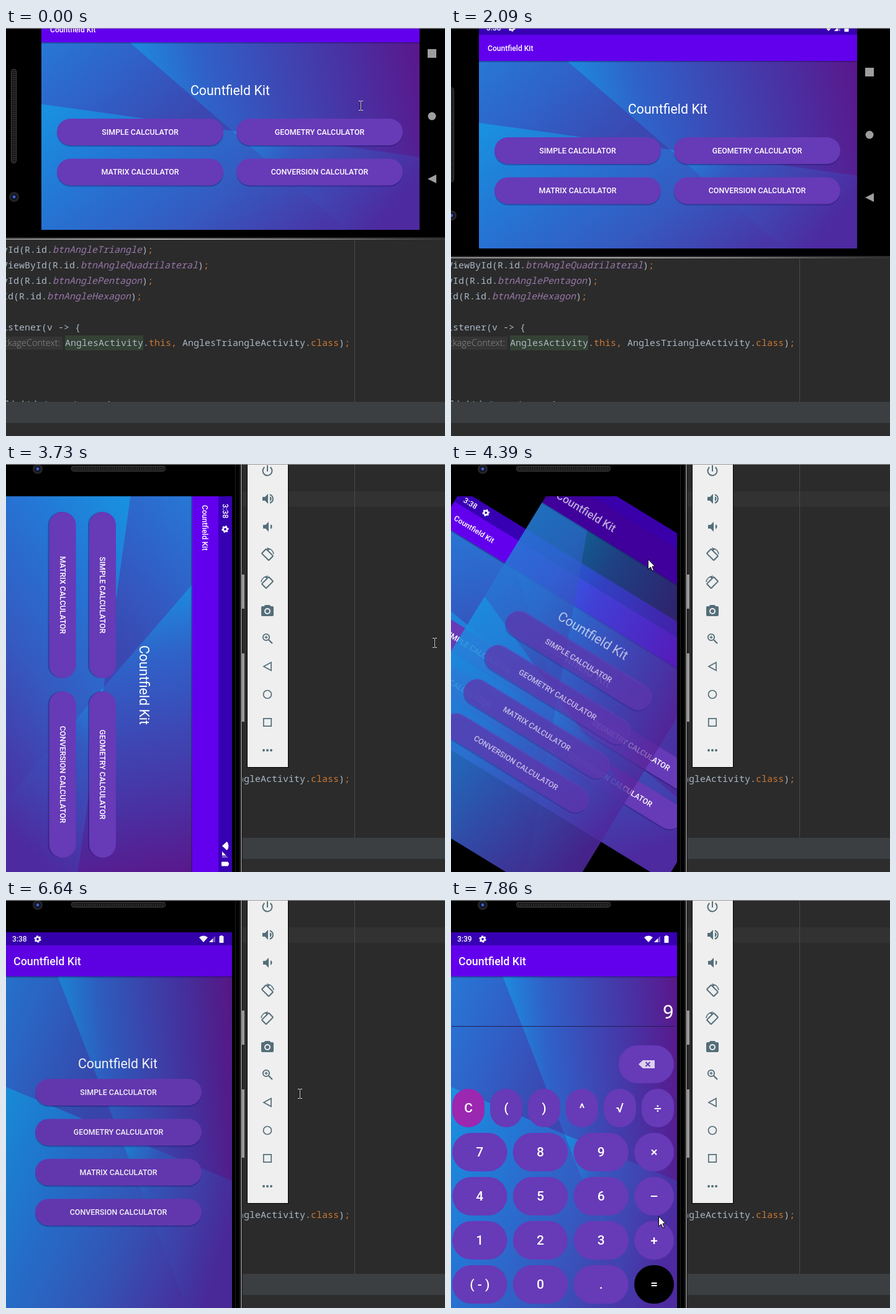
An HTML page with a canvas that plays this animation: 707x657 px, repeating every 8 s.

```html
<!DOCTYPE html>
<html lang="en">
<head>
<meta charset="utf-8">
<title>Calculator app rotation demo</title>
<style>
  html, body { margin: 0; width: 100%; height: 100%; overflow: hidden; background: #2b2b2b; }
  canvas { display: block; }
</style>
</head>
<body>
<canvas id="stage" width="707" height="657"></canvas>
<script>
const c = document.getElementById('stage').getContext('2d');
const LOOP = 8000, TURNED = 3490, TAU = Math.PI * 2;
const APP = 'Countfield Kit', MODES = ['SIMPLE', 'GEOMETRY', 'MATRIX', 'CONVERSION'];
const VIOLET = '#673ab7', SLATE = '#546e7a', GREY = '#9e9e9e';
const WIDE = [609, 366], TALL = [366, 609];

// Waypoints: arrival time, x, y
const windowPath = [[1400, 57, -41], [1580, 60, -30], [2090, 45, -11], [2240, 44, 2], [2640, 45, 8]];
const cursorPath = [[0, 571, 125], [790, 628, 27], [1060, 760, -20], [2950, 569, 110], [3340, 520, 177],
  [3730, 691, 289], [3880, 476, 204], [4510, 247, 131], [5020, 333, 43], [5140, 292, 59], [5440, 404, 179],
  [5980, 229, 331], [6370, 49, 310], [6640, 474, 312], [7030, 129, 410], [7470, 236, 408], [7860, 334, 509]];

const ramp = (t, from, to) => Math.min(1, Math.max(0, (t - from) / (to - from)));
const ease = p => p * p * (3 - 2 * p);

// Rests at each waypoint, then takes at most `longest` ms to reach the next
function along(path, t, longest) {
  const i = Math.max(1, path.findIndex(p => p[0] > t));
  const [from, to] = t >= path.at(-1)[0] ? [path.at(-1), path.at(-1)] : [path[i - 1], path[i]];
  const p = ramp(t, Math.max(from[0], to[0] - longest), to[0] + 1e-6);
  return [1, 2].map(k => Math.round(from[k] + (to[k] - from[k]) * p));
}

function isolated(draw) { c.save(); draw(); c.restore(); }

function rect(x, y, w, h, color) { c.fillStyle = color; c.fillRect(x, y, w, h); }

function pill(x, y, w, h, color, r = Math.min(w, h) / 2) {
  c.fillStyle = color;
  c.beginPath(); c.roundRect(x, y, w, h, r); c.fill();
}

function poly(points, color) {
  c.fillStyle = color;
  c.beginPath();
  points.forEach(p => c.lineTo(...p));
  c.closePath(); c.fill();
}

function disc(x, y, r, color) {
  c.fillStyle = color;
  c.beginPath(); c.arc(x, y, r, 0, TAU); c.fill();
}

function stroke(color, width, build) {
  c.strokeStyle = color;
  c.lineWidth = width;
  c.beginPath(); build(); c.stroke();
}

const line = (x0, y0, x1, y1) => { c.moveTo(x0, y0); c.lineTo(x1, y1); };

function shade(x0, y0, x1, y1, ...colors) {
  const g = c.createLinearGradient(x0, y0, x1, y1);
  colors.forEach((color, i) => g.addColorStop(i / (colors.length - 1), color));
  return g;
}

// cy is the middle of the capital letters
function label(str, x, cy, size, weight = 500, align = 'center') {
  c.font = `${weight} ${size}px Roboto, sans-serif`;
  c.textAlign = align;
  c.fillStyle = '#fff';
  c.fillText(str, x, cy + size * 0.355);
}

// ---- code editor ----
function code(x, y, ...parts) {
  c.textAlign = 'left';
  parts.forEach(([str, color = '#a9b7c6', style = '']) => {
    c.font = style + ' 15px "Noto Sans Mono", monospace';
    c.fillStyle = color;
    c.fillText(str, x, y);
    x += str.length * 9;
  });
}

function editor() {
  const orange = '#cc7832';
  rect(0, 0, 707, 657, '#2b2b2b');
  rect(0, 44, 707, 25, '#323232');
  rect(561, 0, 1, 602, '#4a4a4a');
  [['Triangle', 75], ['Quadrilateral', 120], ['Pentagon', 75], ['Hexagon', 66]].forEach(([shape, x], i) =>
    code(x - 162, 362 + i * 25, ['findViewById(R.id.'], ['btnAngle' + shape, '#9876aa', 'italic'], [')'], [';', orange]));
  code(-105, 487, ['setOnClickListener(v -> {']);
  rect(0, 497, 91, 21, '#353535');
  c.font = '300 14.5px "Open Sans", sans-serif';
  c.textAlign = 'right';
  c.fillStyle = '#909090';
  c.fillText('packageContext:', 87, 512);
  rect(95, 495, 126, 24, '#344134');
  code(95, 512, ['AnglesActivity.'], ['this,', orange], [' AnglesTriangleActivity.'], ['class', orange], [')'], [';', orange]);
  code(-56, 611, ['setOnClickListener(v -> {']);
  rect(0, 602, 707, 34, '#3c3f41');
  rect(0, 636, 707, 21, '#2d2d2d');
}

// ---- phone hardware, in landscape coordinates from the screen's corner ----
function phone() {
  const strip = (y, h, color) => rect(-300, y, 1300, h, color);
  strip(-17, 400, '#111');
  strip(-16, 2, '#777');
  rect(126, -20, 55, 4, '#999');
  rect(253, -20, 110, 4, '#999');
  strip(-11, 389, '#000');
  strip(-6, 1, '#222');
  strip(378, 5, '#2a2a2a');
  strip(380, 2, shade(-57, 0, 650, 0, '#8a8a8a', '#b0b0b0', '#888', '#333'));
  pill(-49, 107, 9, 152, '#484848');
  pill(-48, 108, 7, 150, '#141414');
  for (let y = 111; y < 256; y += 3) rect(-47, y, 5, 1, '#3a3a3a');
  ['#262626', '#10142c', '#4260c0'].forEach((color, i) => disc(-44, 313, 8 - i * 2.8, color));
  rect(622, 75, 14, 14, GREY);
  disc(629, 183, 6.5, GREY);
  poly([[622, 284], [636, 277], [636, 291]], GREY);
}

// ---- app screens ----
function wallpaper(w, top, h) {
  const cross = [.505, .473];
  isolated(() => {
    c.translate(0, top);
    c.scale(w, h - top);
    rect(0, 0, 1, 1, shade(.22, .08, 1, 0, '#1b8fe0', '#2f62c8', '#3d48b5', '#4a30a2', '#5a178b'));
    poly([[0, 0], [.233, 0], cross, [0, .33]], shade(0, 0, .47, .25, '#2778d6', '#3060c6', '#3b48b2'));
    poly([[0, .33], cross, [.808, 1], [0, 1]], shade(0, .38, .8, .9, '#1990e0', '#2673d3', '#355ac0', '#4836a8'));
    poly([cross, [1, .612], [1, 1], [.808, 1]], shade(.5, .52, 1, .72, '#1e88dc', '#3558c0', '#4242b0', '#4d2a9f'));
  });
}

function appFrame([w, h], barTop, barEnd, titleSize, time) {
  wallpaper(w, barEnd, h);
  rect(0, barEnd, w, 2, 'rgba(20,10,80,.35)');
  rect(0, 0, w, barEnd, '#6200ee');
  rect(0, 0, w, barTop, '#3700b3');
  label(APP, 14, (barTop + barEnd) / 2 + .5, titleSize, 500, 'left');
  label(time, 12, 11, 12, 500, 'left');
  stroke('#fff', 2.6, () => c.arc(53, 11, 3.2, 0, TAU));
  c.setLineDash([2.6, 2.4]);
  stroke('#fff', 1.8, () => c.arc(53, 11, 4.8, 0, TAU));
  c.setLineDash([]);
  c.fillStyle = '#fff';
  c.beginPath(); c.moveTo(w - 46, 16); c.arc(w - 46, 16, 10.5, -2.3, -.84); c.fill();
  const signal = (size, color) => poly([[w - 37, 16], [w - 37 + size, 16], [w - 37 + size, 16 - size]], color);
  signal(10, 'rgba(255,255,255,.35)');
  signal(6, '#fff');
  pill(w - 20.5, 6, 7, 11, '#fff', 1);
  rect(w - 18.5, 5, 3, 2, '#fff');
}

function menuButton(name, x, y) {
  pill(x, y + 2, 268, 43, 'rgba(20,15,90,.35)');
  pill(x, y, 268, 43, VIOLET);
  label(name + ' CALCULATOR', x + 134, y + 21.5, 12.4);
}

function wideMenu() {
  appFrame(WIDE, 22, 64, 12.1, '3:38');
  label(APP, 304, 141, 21.4, 400);
  MODES.forEach((name, i) => menuButton(name, 25 + i % 2 * 289, 187 + (i >> 1) * 64.4));
}

function tallMenu() {
  appFrame(TALL, 21, 71, 17.9, '3:38');
  label(APP, 182, 211, 21.4, 400);
  MODES.forEach((name, i) => menuButton(name, 49, 236 + i * 64.4));
}

function key(name, x, y, w) {
  pill(x, y, w, 62, { C: '#9c27b0', '=': '#000' }[name] || VIOLET);
  label(name, x + w / 2, y + 31, 21);
}

function keypad(value) {
  appFrame(TALL, 21, 71, 17.9, '3:39');
  label(value, 361, 128, 32, 400, 'right');
  rect(3, 151, 359, 1, '#211d55');
  pill(272, 182, 89, 61, VIOLET);
  poly([[304, 212.5], [311, 206], [330, 206], [330, 219], [311, 219]], '#dcd2ee');
  stroke(VIOLET, 2, () => { line(315.5, 209, 322.5, 216); line(322.5, 209, 315.5, 216); });
  [...'C()^√÷'].forEach((name, i) => key(name, 4 + i * 61, 252, 52));
  ['7 8 9 ×', '4 5 6 –', '1 2 3 +', '(-) 0 . ='].forEach((row, r) =>
    row.split(' ').forEach((name, i) =>
      key(name.replace('(-)', '( - )'), 4 + i * 97.7, 323 + r * 71, i < 3 ? 88.5 : 64)));
}

// ---- emulator toolbar: each icon is drawn around its own centre ----
const ring = (x, y, r, width = 2, from = 0, to = TAU) => stroke(SLATE, width, () => c.arc(x, y, r, from, to));

function speaker(x, waves) {
  poly([[x - 9, -3], [x - 5, -3], [x, -8], [x, 8], [x - 5, 3], [x - 9, 3]], SLATE);
  c.fillStyle = SLATE;
  c.beginPath(); c.arc(x + 1.5, 0, 4, -1.2, 1.2); c.fill();
  if (waves > 1) ring(x + 1, 0, 7, 1.9, -1.3, 1.3);
}

function rotation(flip) {
  c.scale(flip, 1);
  ring(0, 0, 10, 1.6, -1.4, -.1);
  poly([[-1, -12], [4, -9], [1, -6]], SLATE);
  c.rotate(Math.PI / 4);
  stroke(SLATE, 2, () => c.roundRect(-8, -5, 16, 10, 1));
}

const icons = [
  () => { ring(0, 0, 7.5, 2, -.9, Math.PI + .9); stroke(SLATE, 2, () => line(0, -9, 0, 1)); },
  () => speaker(1, 2),
  () => speaker(2, 1),
  () => rotation(1),
  () => rotation(-1),
  () => {
    pill(-10, -7, 20, 16, SLATE, 2);
    pill(-5, -9, 10, 5, SLATE, 2);
    disc(0, 1, 5, '#efefef');
    disc(0, 1, 3, SLATE);
  },
  () => {
    ring(-2, -2, 5.2, 1.8);
    stroke(SLATE, 1.4, () => { line(-4.5, -2, .5, -2); line(-2, -4.5, -2, .5); });
    stroke(SLATE, 2.2, () => line(2, 2, 8, 8));
  },
  () => stroke(SLATE, 1.7, () => { line(-6, 0, 6, -6.5); c.lineTo(6, 6.5); c.closePath(); }),
  () => ring(0, 0, 6.5, 1.7),
  () => stroke(SLATE, 1.7, () => c.rect(-6.2, -6.2, 12.4, 12.4)),
  () => [-6, 0, 6].forEach(x => disc(x, 0, 2, SLATE)),
];

function toolbar() {
  rect(388, 0, 67, 489, '#000');
  rect(389, 0, 65, 488, '#efefef');
  icons.forEach((icon, i) => isolated(() => {
    c.translate(421, 11 + i * 45);
    icon();
  }));
}

// ---- mouse ----
function pointer() {
  c.translate(.5, .5);
  poly([[0, 0], [0, 16], [4, 12.5], [6.5, 18.5], [9, 17.5], [6.5, 11.5], [11, 11.5]], '#fff');
  c.strokeStyle = '#000';
  c.lineWidth = 1;
  c.stroke();
}

function textCursor() {
  rect(-1, -7, 3, 14, 'rgba(0,0,0,.5)');
  rect(0, -7, 1, 14, '#ddd');
  [-8, 7].forEach(y => [-3, 1].forEach(x => rect(x, y, 3, 1, '#ddd')));
}

function mouse(t) {
  const dragging = t > 1060 && t < 2950;
  if (dragging) return;
  const [x, y] = along(cursorPath, t, 390);
  c.translate(x, y);
  if (t >= TURNED && x < 455) pointer(); else textCursor();
}

// ---- scenes ----
function landscape(t) {
  c.translate(...along(windowPath, t, LOOP));
  phone();
  wideMenu();
}

function turnedScreen([w, h], angle, alpha, draw) {
  isolated(() => {
    c.globalAlpha = alpha;
    c.rotate(angle);
    c.translate(-w / 2, -h / 2);
    draw();
  });
}

function portrait(t) {
  const [w, h] = TALL;
  isolated(() => {
    c.translate(364, 52);
    c.rotate(Math.PI / 2);
    phone();
  });
  c.translate(-2, 52);
  c.beginPath(); c.rect(0, 0, w, h); c.clip();
  rect(0, 0, w, h, '#000');
  const turn = ease(ramp(t, 4030, 4630)), open = ramp(t, 6700, 7100);
  const angle = (1 - turn) * Math.PI / 2;
  isolated(() => {
    c.translate(w / 2, h / 2);
    if (turn < 1) turnedScreen(WIDE, angle, 1, wideMenu);
    if (turn > 0) turnedScreen(TALL, angle, turn, tallMenu);
  });
  if (t >= 6520) rect(0, 0, w, h, `rgba(0,0,0,${.05 + open * .1})`);
  if (open > 0) {
    const hidden = (1 - open) ** 3;
    c.beginPath(); c.rect(0, h * hidden, w, h); c.clip();
    c.translate(0, 25 * hidden);
    keypad(t >= 7470 ? '9' : '');
  }
}

function draw(now) {
  const t = now % LOOP, turned = t >= TURNED;
  editor();
  isolated(() => turned ? portrait(t) : landscape(t));
  if (turned) toolbar();
  rect(0, 0, 707, 1, '#999');
  isolated(() => mouse(t));
  requestAnimationFrame(draw);
}
requestAnimationFrame(draw);
</script>
</body>
</html>
```
